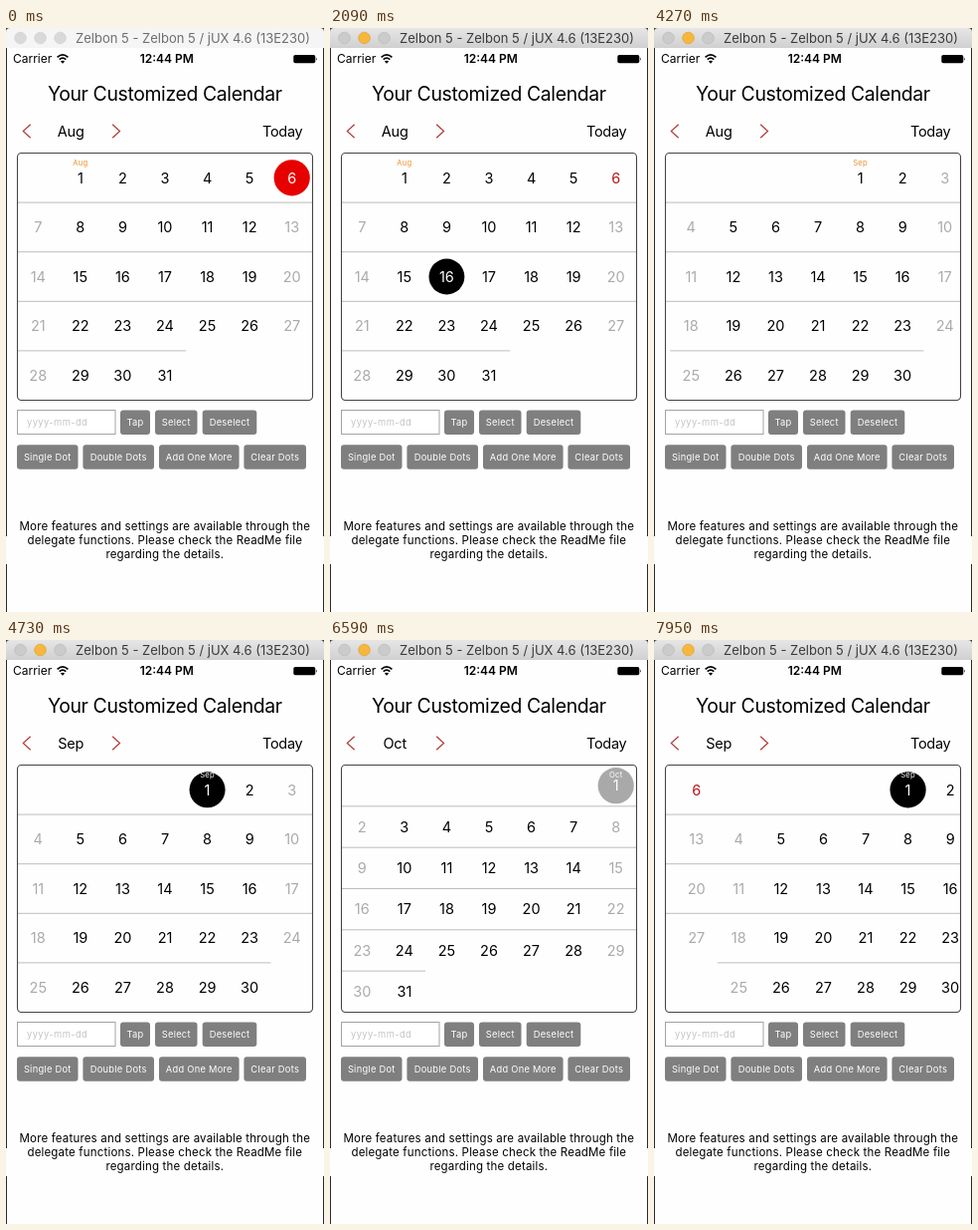
Recreate the animation shown at these times as an HTML page. Size 320 px wide and 586 px high, loop 8 s.

```html
<!DOCTYPE html>
<html lang="en">
<head>
<meta charset="utf-8">
<title>Calendar</title>
<style>
html, body { margin: 0; width: 100%; height: 100%; overflow: hidden; background: #fefefe; }
svg { display: block; width: 100vw; height: 100vh; }
text { font-family: Inter, "Open Sans", sans-serif; white-space: pre; }
</style>
</head>
<body>
<svg id="stage" viewBox="0 0 320 586">
  <defs>
    <linearGradient id="bar" x2="0" y2="1">
      <stop offset="0" stop-color="#e6e6e6"/><stop offset="1" stop-color="#d0d0d0"/>
    </linearGradient>
    <clipPath id="grid"><rect x="11.5" y="125.5" width="297" height="248" rx="4"/></clipPath>
  </defs>
</svg>
<script>
const LOOP = 8000, LAST = 7950, ACTIVATE = 1650, SCROLL = 350;
const LEFT = 11, TOP = 125.5, WIDTH = 298, HEIGHT = 248, CELL = WIDTH / 7;
const TODAY = { month: 0, day: 6 };

// first: weekday column of day 1
const months = [
  { name: 'Aug', first: 1, days: 31, rows: 5 },
  { name: 'Sep', first: 4, days: 30, rows: 5 },
  { name: 'Oct', first: 6, days: 31, rows: 6 }
];
const picks = [
  { at: -5000, month: 0, day: 6 },
  { at: 1700, month: 0, day: 16 },
  { at: 3080, month: 0, day: 31 },
  { at: 4300, month: 1, day: 1 },
  { at: 5603, month: 2, day: 1 },
  { at: 7250, month: 1, day: 1 }
];
const scrolls = [
  { at: 3950, from: 0, to: 1 },
  { at: 5253, from: 1, to: 2 },
  { at: 6900, from: 2, to: 1 },
  { at: 7853, from: 1, to: 0 }
];

const stage = document.getElementById('stage');

function add(parent, tag, attrs) {
  const el = document.createElementNS('http://www.w3.org/2000/svg', tag);
  for (const key in attrs) el.setAttribute(key, attrs[key]);
  parent.appendChild(el);
  return el;
}

// y is the middle of the capitals
function label(parent, str, x, y, size, attrs) {
  const el = add(parent, 'text', { x, y: y + size * 0.364, 'font-size': size, ...attrs });
  el.textContent = str;
  return el;
}

const centered = { 'text-anchor': 'middle' };

function button(str, x, y, w) {
  add(stage, 'rect', { x, y, width: w, height: 24.6, rx: 3, fill: '#7f7f7f' });
  label(stage, str, x + w / 2, y + 12.4, 9.3, { ...centered, fill: '#fff', 'letter-spacing': 0.27 });
}

function chevron(x, dir) {
  add(stage, 'path', {
    d: `M${x} 96.8l${7.3 * dir} 6.7l${-7.3 * dir} 6.7`,
    fill: 'none', stroke: '#b03a34', 'stroke-width': 1.2
  });
}

// Window frame, with a gap in both side edges
add(stage, 'rect', { width: 320, height: 586, fill: '#fefefe' });
for (const x of [0, 319]) {
  add(stage, 'path', { d: `M${x + 0.5} 19V510M${x + 0.5} 538V586`, stroke: '#2a2a2a' });
}
add(stage, 'path', { d: 'M0 0H320V20H0Z', fill: '#333' });
const bar = add(stage, 'path', { d: 'M0 20V4Q0 0 4 0H316Q320 0 320 4V20Z' });
const lights = [14.5, 34.5, 54.5].map(cx =>
  add(stage, 'circle', { cx, cy: 10, r: 5.8, 'stroke-width': 0.7 }));
const title = label(stage, 'Zelbon 5 - Zelbon 5 / jUX 4.6 (13E230)', 188, 10, 13, centered);

// Status bar
label(stage, 'Carrier', 7, 31, 12);
label(stage, '12:44 PM', 161.8, 31, 12, { ...centered, 'font-weight': 600 });
add(stage, 'path', {
  d: 'M51.6 29.3Q57 24.4 62.4 29.3M53.7 31.6Q57 28.6 60.3 31.6',
  fill: 'none', stroke: '#000', 'stroke-width': 1.7
});
add(stage, 'path', { d: 'M57 35.8L54.9 33.6Q57 31.9 59.1 33.6Z' });
add(stage, 'rect', { x: 289.3, y: 26.9, width: 22, height: 8.4, rx: 1.8 });
add(stage, 'path', { d: 'M312 29.4Q313.6 31.1 312 32.8Z' });

// Heading
label(stage, 'Your Customized Calendar', 159.8, 65.8, 19.4, { ...centered, 'letter-spacing': -0.36 });
chevron(24.6, -1);
chevron(107.2, 1);
const monthName = label(stage, '', 65.2, 103.5, 14.5, { ...centered, 'letter-spacing': -0.2 });
label(stage, 'Today', 298.4, 103.5, 14.5, { 'text-anchor': 'end', 'letter-spacing': -0.3 });

// Calendar pages
const view = add(stage, 'g', { 'clip-path': 'url(#grid)' });
const pages = months.map((m, index) => {
  const group = add(view, 'g', {});
  const rowHeight = HEIGHT / m.rows;
  const cells = [];
  for (let row = 1; row < m.rows; row++) {
    const cols = Math.min(7, m.first + m.days - row * 7);
    const y = TOP + row * rowHeight;
    add(group, 'path', { d: `M${LEFT} ${y}h${cols * CELL}`, stroke: '#bdbdbd', 'stroke-width': 1 });
  }
  for (let day = 1; day <= m.days; day++) {
    const slot = m.first + day - 1, col = slot % 7;
    const x = LEFT + (col + 0.5) * CELL;
    const y = TOP + (Math.floor(slot / 7) + 0.5) * rowHeight;
    const weekend = col % 6 === 0;
    const today = index === TODAY.month && day === TODAY.day;
    const dot = add(group, 'circle', { cx: x, cy: y, fill: today ? '#e60000' : weekend ? '#a9a9a9' : '#000' });
    const num = label(group, day, x, y, 14.5, centered);
    const tag = day === 1
      ? label(group, m.name, x, 135.4, 7.6, { ...centered, 'letter-spacing': 0.3 })
      : null;
    cells.push({ dot, num, tag, ink: today ? '#b8141a' : weekend ? '#aaa' : '#000' });
  }
  return { group, cells };
});
add(stage, 'rect', { x: 11.5, y: 125.5, width: 297, height: 248, rx: 4, fill: 'none', stroke: '#444', 'stroke-width': 1.1 });

// Controls
add(stage, 'rect', { x: 11.5, y: 383.5, width: 98.5, height: 24, fill: '#fff', stroke: '#a3a3a3' });
label(stage, 'yyyy-mm-dd', 21, 395.4, 9.3, { fill: '#c4c4c8', 'letter-spacing': 0.45 });
button('Tap', 115, 383.4, 30);
button('Select', 150, 383.4, 42.5);
button('Deselect', 197.7, 383.4, 54.6);
button('Single Dot', 11, 418.2, 61.5);
button('Double Dots', 77.4, 418.2, 71.6);
button('Add One More', 154, 418.2, 80.6);
button('Clear Dots', 239.4, 418.2, 62.6);
['More features and settings are available through the',
 'delegate functions. Please check the ReadMe file',
 'regarding the details.'
].forEach((line, i) =>
  label(stage, line, 159.8, 499.8 + i * 14.2, 11.5, { ...centered, 'letter-spacing': 0.18 }));

// Underdamped spring from half size to full size
function bounce(ms) {
  const t = ms / 1000, decay = 10, freq = 31.8;
  return 1 - 0.5 * Math.exp(-decay * t) * (Math.cos(freq * t) + decay / freq * Math.sin(freq * t));
}

const ease = p => (1 - Math.cos(Math.PI * p)) / 2;

function draw(t) {
  const active = t >= ACTIVATE;
  bar.setAttribute('fill', active ? 'url(#bar)' : '#f5f5f5');
  title.setAttribute('fill', active ? '#3a3a3a' : '#6e6e6e');
  lights.forEach((light, i) => {
    const lit = active && i === 1;
    light.setAttribute('fill', lit ? '#f6b73c' : active ? '#cbcbcb' : '#d9d9d9');
    light.setAttribute('stroke', lit ? '#e0a030' : active ? '#b9b9b9' : '#cfcfcf');
  });

  let position = 0, shown = 0;
  for (const s of scrolls) {
    if (t < s.at) break;
    const p = Math.min(1, (t - s.at) / SCROLL);
    position = s.from + (s.to - s.from) * ease(p);
    if (p === 1) shown = s.to;
  }
  monthName.textContent = months[shown].name;

  const pick = picks.filter(p => p.at <= t).pop();
  pages.forEach((page, m) => {
    page.group.setAttribute('transform', `translate(${(m - position) * WIDTH} 0)`);
    page.cells.forEach((cell, i) => {
      const on = pick.month === m && pick.day === i + 1;
      cell.dot.setAttribute('r', on ? 18.1 * bounce(t - pick.at) : 0);
      cell.num.setAttribute('fill', on ? '#fff' : cell.ink);
      if (cell.tag) cell.tag.setAttribute('fill', on ? '#fff' : '#e8922e');
    });
  });
}

const start = performance.now();
function tick() {
  draw(Math.min(LAST, (performance.now() - start) % LOOP));
  requestAnimationFrame(tick);
}
tick();
</script>
</body>
</html>
```
